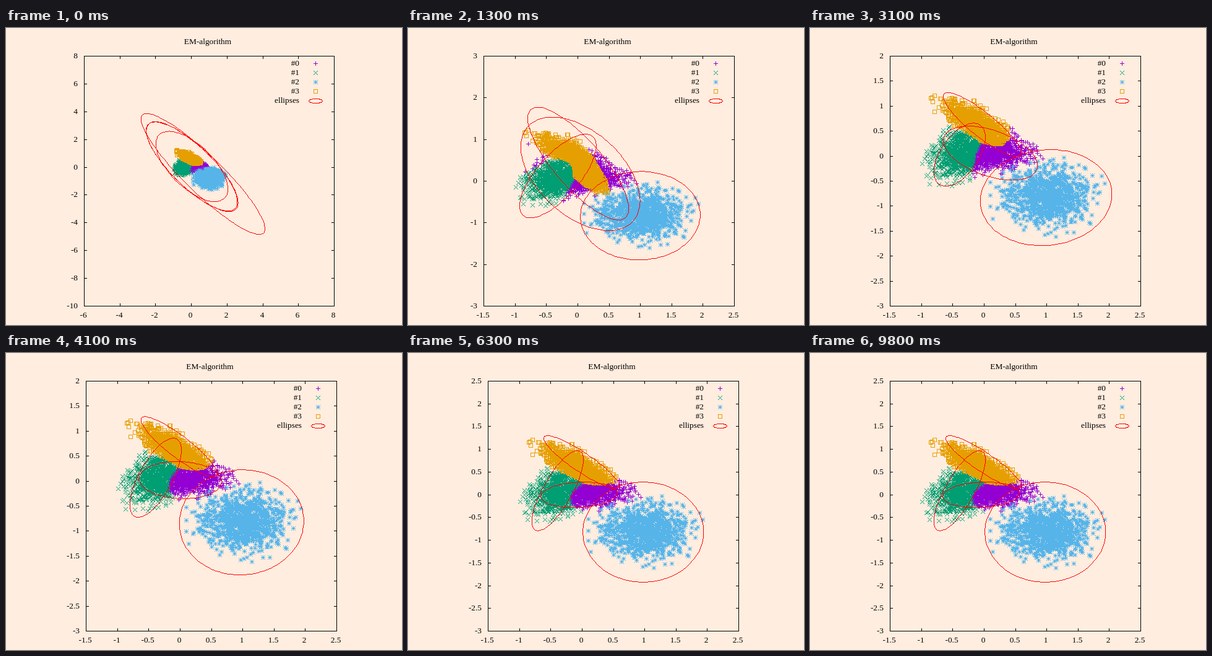
Write an HTML page with a canvas that moves like this. It is 640x480 px and loops after 9.9 s.

```html
<!DOCTYPE html>
<html lang="en">
<head>
<meta charset="utf-8">
<title>EM-algorithm</title>
<style>
  html, body { margin: 0; width: 100%; height: 100%; overflow: hidden; background: #ffeddf; }
  canvas { display: block; width: 640px; height: 480px; }
</style>
</head>
<body>
<canvas id="plot" width="640" height="480"></canvas>
<script>
const ctx = document.getElementById('plot').getContext('2d');
const STEP = 100, STEPS = 99;
const TOP = 45, BOTTOM = 449;
const CLOUD_SIZE = 1000;
const BLUE = 2;

const lerp = (a, b, u) => a + (b - a) * u;
const mix = (a, b, u) => a.map((v, i) => lerp(v, b[i], u));
const easeOut = (u, power) => 1 - (1 - u) ** power;

// Every pose is [centre x, centre y, half width, half height, correlation] in data units.
// cloud is the spread of the points; the ellipse moves from early over middle to settled.
const CLUSTERS = [
  { color: '#9400d3', size: 1,
    cloud: [0.1, 0.03, 0.29, 0.14, 0.1],
    early: [0.02, 0.22, 1.03, 1.68, -0.48],
    middle: [0.1, 0.06, 0.75, 0.54, -0.46],
    settled: [-0.05, 0, 0.61, 0.28, 0.13] },
  { color: '#009e73', size: 1.01,
    cloud: [-0.34, 0.08, 0.23, 0.25, 0.3],
    early: [-0.29, 0.16, 0.69, 1.15, 0.79],
    middle: [-0.39, 0.03, 0.41, 0.63, 0.54],
    settled: [-0.39, 0.09, 0.41, 0.88, 0.77] },
  { color: '#56b4e9', size: 0.79,
    cloud: [1.01, -0.8, 0.34, 0.28, 0.03],
    early: [1, -0.83, 0.92, 1.1, 0],
    middle: [0.99, -0.83, 1.05, 0.96, 0.07],
    settled: [0.975, -0.82, 0.963, 1.1, 0] },
  { color: '#e69f00', size: 1.36,
    cloud: [-0.08, 0.62, 0.26, 0.22, -0.75],
    early: [0.02, 0.34, 0.88, 1.63, -0.77],
    middle: [-0.03, 0.63, 0.62, 0.64, -0.88],
    settled: [-0.01, 0.72, 0.6, 0.58, -0.9] }
];

// All ellipses open as one family: the larger, the narrower and further off
for (const c of CLUSTERS) {
  const shift = Math.max(0, c.size - 1);
  c.start = [0.02 + 1.75 * shift, 0.06 - 1.5 * shift, 2.55 * c.size, 3.2 * c.size,
    0.2 / c.size ** 2.5 - 1];
}

const LEGS = [
  { from: 'start', to: 'early', begin: 0, end: 600, power: 4 },
  { from: 'early', to: 'middle', begin: 600, end: 3100, power: 1 },
  { from: 'middle', to: 'settled', begin: 3100, end: 6500, power: 3 }
];

function poseAt(cluster, ms) {
  const leg = LEGS.find(l => ms < l.end);
  if (!leg) return cluster.settled;
  const u = easeOut((ms - leg.begin) / (leg.end - leg.begin), leg.power);
  return mix(cluster[leg.from], cluster[leg.to], u);
}

// The assumed distribution narrows from the early ellipse to the true cloud
function beliefAt(cluster, ms) {
  const wide = ms < STEP ? 0 : Math.min(1, Math.max(0, (5000 - ms) / 4400)) ** 2;
  const early = cluster.early.map((v, i) => i === 2 || i === 3 ? v / 2.6 : v);
  return mix(cluster.cloud, early, wide);
}

function misfit({ x, y }, [cx, cy, sx, sy, rho]) {
  const a = (x - cx) / sx, b = (y - cy) / sy, rest = 1 - rho * rho;
  return (a * a + b * b - 2 * rho * a * b) / rest + 2 * Math.log(sx * sy * Math.sqrt(rest));
}

// The blue cloud lies apart and always keeps its own points
function classify(point, beliefs) {
  if (point.home === BLUE) return BLUE;
  const costs = beliefs.map((b, i) => i === BLUE ? Infinity : misfit(point, b));
  return costs.indexOf(Math.min(...costs));
}

let seed = 4711;
function random() {
  seed = (seed + 0x6d2b79f5) | 0;
  let t = Math.imul(seed ^ (seed >>> 15), 1 | seed);
  t = (t + Math.imul(t ^ (t >>> 7), 61 | t)) ^ t;
  return ((t ^ (t >>> 14)) >>> 0) / 4294967296;
}

// Normal distribution, cut off at three deviations
const points = CLUSTERS.flatMap(({ cloud: [cx, cy, sx, sy, rho] }, home) =>
  Array.from({ length: CLOUD_SIZE }, () => {
    const r = Math.sqrt(-2 * Math.log(1 - 0.99 * random())), a = 2 * Math.PI * random();
    const n = r * Math.cos(a), m = r * Math.sin(a);
    return { x: cx + sx * n, y: cy + sy * (rho * n + Math.sqrt(1 - rho * rho) * m), home };
  }));

// Axis ranges in force from the given time on
function makeView(from, left, right, xMin, xMax, yMin, yMax) {
  const sx = (right - left) / (xMax - xMin), sy = (BOTTOM - TOP) / (yMax - yMin);
  return {
    from, left, right, sx, sy, xMin, xMax, yMin, yMax,
    px: x => left + (x - xMin) * sx,
    py: y => BOTTOM - (y - yMin) * sy
  };
}
const VIEWS = [
  makeView(0, 126, 530, -6, 8, -10, 8),
  makeView(100, 122, 527, -2, 2.5, -3, 3),
  makeView(1300, 122, 527, -1.5, 2.5, -3, 3),
  makeView(2500, 129, 534, -1.5, 2.5, -3, 2.5),
  makeView(3100, 129, 534, -1.5, 2.5, -3, 2),
  makeView(4500, 129, 534, -1.5, 2.5, -3, 2.5)
];

function ticks(min, max) {
  const span = max - min, step = span > 10 ? 2 : span > 5.5 ? 1 : 0.5;
  return Array.from({ length: span / step + 1 }, (_, i) => min + i * step);
}

// Crisp 7 x 7 markers: plus, cross, star, square
const MARKERS = CLUSTERS.map(({ color }, kind) => {
  const c = document.createElement('canvas');
  c.width = c.height = 7;
  const g = c.getContext('2d');
  g.fillStyle = color;
  for (let x = -3; x <= 3; x++) for (let y = -3; y <= 3; y++) {
    const plus = x === 0 || y === 0, cross = Math.abs(x) === Math.abs(y);
    const ring = Math.max(Math.abs(x), Math.abs(y)) === 3;
    if ([plus, cross, plus || cross, ring][kind]) g.fillRect(x + 3, y + 3, 1, 1);
  }
  return c;
});
const mark = (kind, x, y) => ctx.drawImage(MARKERS[kind], Math.round(x) - 3, Math.round(y) - 3);

// One pixel wide outline without smoothing
function ellipse(cx, cy, w, h, rho) {
  const tilt = Math.asin(rho), sides = 120;
  const corner = i => {
    const a = 2 * Math.PI * i / sides;
    return [Math.round(cx + w * Math.cos(a)), Math.round(cy - h * Math.sin(a + tilt))];
  };
  ctx.fillStyle = '#f00';
  for (let i = 0; i < sides; i++) {
    const p = corner(i), q = corner(i + 1);
    const n = Math.max(Math.abs(q[0] - p[0]), Math.abs(q[1] - p[1]), 1);
    for (let k = 0; k < n; k++) {
      const [x, y] = mix(p, q, k / n);
      ctx.fillRect(Math.round(x), Math.round(y), 1, 1);
    }
  }
}

function text(str, x, y, align) {
  ctx.textAlign = align;
  ctx.fillText(str, x, y);
}

function drawAxes(v) {
  const { left, right } = v;
  ctx.fillStyle = ctx.strokeStyle = '#000';
  ctx.lineWidth = 1;
  ctx.strokeRect(left + 0.5, TOP + 0.5, right - left, BOTTOM - TOP);
  for (const value of ticks(v.xMin, v.xMax)) {
    const x = Math.round(v.px(value));
    ctx.fillRect(x, TOP, 1, 5);
    ctx.fillRect(x, BOTTOM - 4, 1, 5);
    text(String(value), x - 1, 468, 'center');
  }
  for (const value of ticks(v.yMin, v.yMax)) {
    const y = Math.round(v.py(value));
    ctx.fillRect(left, y, 5, 1);
    ctx.fillRect(right - 4, y, 5, 1);
    text(String(value), left - 10, y + 4, 'right');
  }
  text('EM-algorithm', (left + right) / 2 - 2, 26, 'center');
}

function drawLegend(right) {
  for (let i = 0; i <= CLUSTERS.length; i++) {
    const y = 57 + 15 * i, isCluster = i < CLUSTERS.length;
    ctx.fillStyle = '#000';
    text(isCluster ? '#' + i : 'ellipses', right - 56, y + 4, 'right');
    if (isCluster) mark(i, right - 30, y);
    else ellipse(right - 30, y + 0.5, 11, 3.5, 0);
  }
}

function draw(ms) {
  const view = VIEWS.filter(v => v.from <= ms).pop();
  ctx.fillStyle = '#ffeddf';
  ctx.fillRect(0, 0, 640, 480);
  ctx.font = '13.33px "Liberation Serif", serif';

  const beliefs = CLUSTERS.map(c => beliefAt(c, ms));
  const groups = CLUSTERS.map(() => []);
  for (const p of points) groups[classify(p, beliefs)].push(p);
  groups.forEach((group, kind) => {
    for (const p of group) mark(kind, view.px(p.x), view.py(p.y));
  });
  for (const c of CLUSTERS) {
    const [x, y, w, h, rho] = poseAt(c, ms);
    ellipse(view.px(x), view.py(y), w * view.sx, h * view.sy, rho);
  }
  drawAxes(view);
  drawLegend(view.right);
}

const begin = performance.now();
let shown = -1;
function tick() {
  const step = Math.floor((performance.now() - begin) / STEP) % STEPS;
  if (step !== shown) {
    shown = step;
    draw(step * STEP);
  }
  requestAnimationFrame(tick);
}
tick();
</script>
</body>
</html>
```
